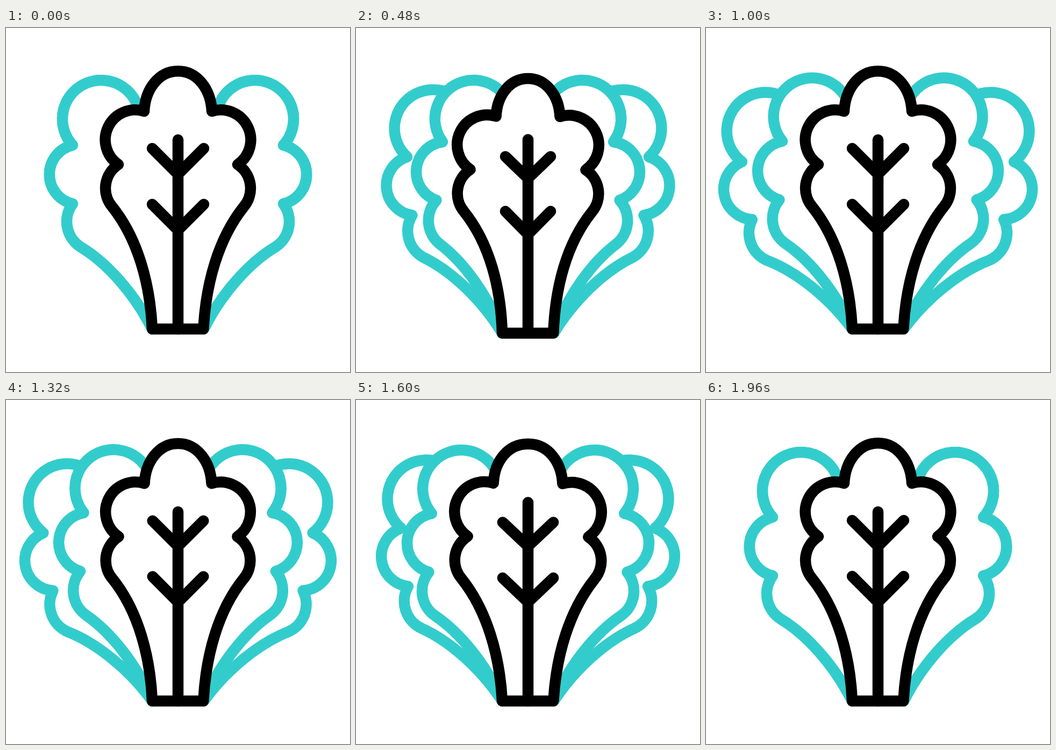
Recreate the animation shown at these times as an HTML page. Size 640 px wide and 640 px high, loop 2000 ms.

```html
<!DOCTYPE html>
<html lang="en">
<head>
<meta charset="utf-8">
<title>Lettuce</title>
<style>
html, body { margin: 0; width: 100%; height: 100%; overflow: hidden; background: #fff; }
svg { display: block; width: 100%; height: 100%; }
path { fill: #fff; stroke: #33cccc; stroke-width: 20.5; stroke-linecap: round; stroke-linejoin: round; }
.front { stroke: #000; }
#veins { fill: none; }
</style>
</head>
<body>
<svg viewBox="0 0 640 640">
  <defs>
    <path id="leaf" d="M272 560C240 495 188 437 140 408A56 56 0 0 1 124 327A56 56 0 0 1 124 218A72 72 0 1 1 249 169"/>
  </defs>
  <g id="plant">
    <use href="#leaf" class="outer"/>
    <g transform="matrix(-1 0 0 1 640 0)"><use href="#leaf" class="outer"/></g>
    <use href="#leaf" class="inner"/>
    <g transform="matrix(-1 0 0 1 640 0)"><use href="#leaf" class="inner"/></g>
    <path id="heart" class="front"/>
    <path id="veins" class="front"/>
  </g>
</svg>
<script>
const LOOP = 2000, STEP = 40;
const $ = id => document.getElementById(id);

// Eased rise from 0 to 1, and a rise followed by a fall
function ramp(t, from, to) {
  const u = Math.min(1, Math.max(0, (t - from) / (to - from)));
  return u * u * (3 - 2 * u);
}
const pulse = (t, from, top, to) => ramp(t, from, top) - ramp(t, top, to);

function heartPath(fold, flare) {
  const dx = 8 * fold - 9 * flare, dy = 3.4 * fold - 3.5 * flare;
  const left = (x, y) => `${x + dx} ${y + dy} `;
  const right = (x, y) => `${640 - x - dx} ${y + dy + 2.2 * flare} `;
  const peak = 80.3 + 10.2 * fold - 5.5 * flare, half = 36 - dx;
  const waist = 268 + 0.4 * dx;
  return `M272 560C${waist} 475 ${left(245, 392)}${left(198, 333)}` +
    `A53 53 0 0 1 ${left(209, 254)}A55.6 55.6 0 0 1 ${left(257, 155)}` +
    `C${left(259, 114)}${320 - half} ${peak} 320 ${peak}` +
    `C${320 + half} ${peak} ${right(259, 114)}${right(257, 155)}` +
    `A55.6 55.6 0 0 1 ${right(209, 254)}A53 53 0 0 1 ${right(198, 333)}` +
    `C${right(245, 392)}${640 - waist} 475 367.3 560Z`;
}

function veinPath(fold, flare) {
  const half = 48 - 10.5 * fold + 7 * flare;
  const fork = (y, dip) => `M${320 - half} ${y - 48 + dip}L320 ${y}L${320 + half} ${y - 48 + dip}`;
  return `M320 560V${208 - 32 * flare}` +
    fork(272, 11 * fold - 2.5 * flare) + fork(376, 7.5 * fold - 0.5 * flare);
}

function rotate(name, angle) {
  for (const el of document.querySelectorAll('.' + name))
    el.setAttribute('transform', `rotate(${angle} 272 560)`);
}

function draw(now) {
  const t = Math.floor((now % LOOP) / STEP) * STEP;
  const open = ramp(t, 80, 360) - ramp(t, 1705, 1940);
  const flare = pulse(t, 80, 360, 540) + pulse(t, 1480, 1705, 1940);
  const fold = pulse(t, 360, 540, 725) + pulse(t, 1290, 1480, 1705);
  const lift = 19.4 * pulse(t, 80, 360, 680) - 17.6 * pulse(t, 360, 680, 1000);
  rotate('outer', -10 * open + 6.8 * fold);
  rotate('inner', 3 * open + 6 * fold - 5.3 * flare);
  $('heart').setAttribute('d', heartPath(fold, flare));
  $('veins').setAttribute('d', veinPath(fold, flare));
  $('plant').setAttribute('transform', `translate(0 ${lift})`);
}

const start = performance.now();
function tick() {
  draw(performance.now() - start);
  requestAnimationFrame(tick);
}
tick();
</script>
</body>
</html>
```
